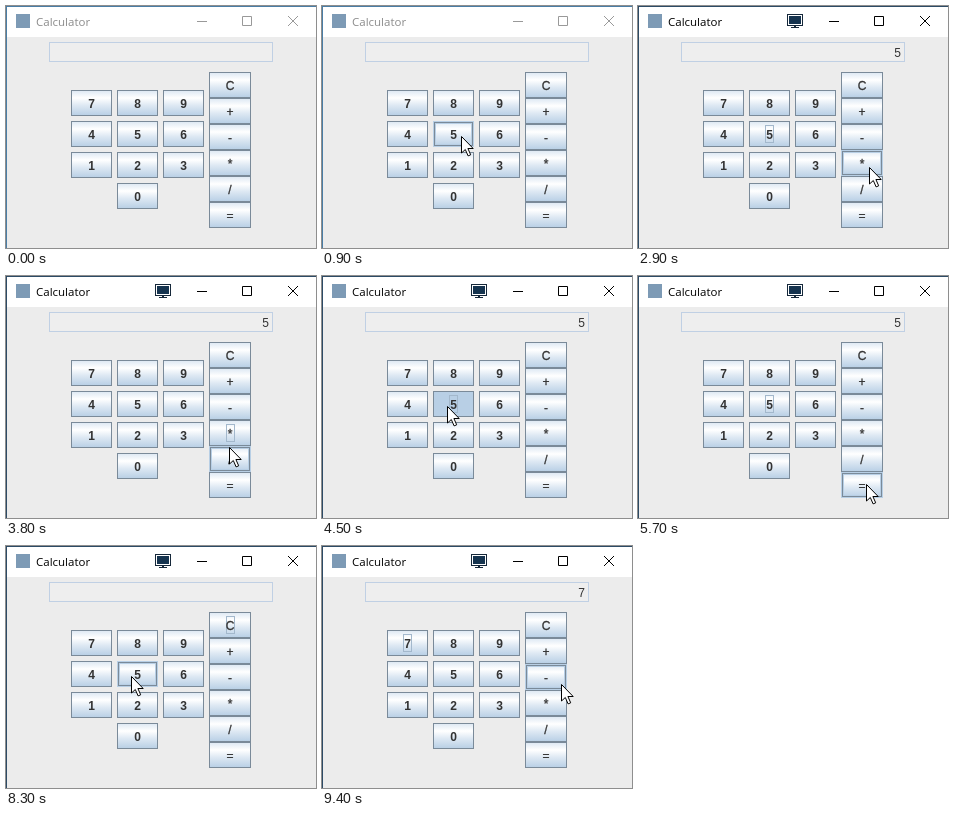
Animation, 310 px wide and 242 px high, one loop 9500 ms. Source, as an HTML page:

```html
<!DOCTYPE html>
<html lang="en">
<head>
<meta charset="utf-8">
<title>Calculator</title>
<style>
html, body { margin: 0; width: 100%; height: 100%; overflow: hidden; background: #ececec; }
svg { display: block; width: 310px; height: 242px; }
text { font-family: "Liberation Sans", Arial, sans-serif; font-size: 12px; fill: #333; }
.key text { font-weight: bold; text-anchor: middle; }
.key .op { font-weight: normal; stroke: #333; stroke-width: .3px; }
.title { font-family: "Open Sans", "Noto Sans", sans-serif; font-size: 11.5px; }
.caption { fill: none; stroke-width: 1; }
</style>
</head>
<body>
<svg viewBox="0 0 310 242">
  <defs>
    <linearGradient id="steel" x1="0" y1="0" x2="0" y2="1">
      <stop offset="0" stop-color="#dde8f3"/>
      <stop offset=".3" stop-color="#fff"/>
      <stop offset=".6" stop-color="#dde8f3"/>
      <stop offset="1" stop-color="#b8cfe5"/>
    </linearGradient>
  </defs>
  <rect width="310" height="242" fill="#ececec"/>
  <rect width="310" height="31" fill="#fff"/>
  <path id="edge" d="M0 .5H310M.5 0V242" fill="none"/>
  <rect x="10" y="8" width="14" height="14" fill="#7d9ab5"/>
  <text id="title" class="title" x="30" y="20">Calculator</text>
  <g id="monitor">
    <rect x="149.5" y="8.5" width="15" height="11" fill="#fff" stroke="#16283a"/>
    <rect x="151" y="10" width="12" height="8" fill="#16344f"/>
    <path d="M156 20h2v1h3v1h-8v-1h3z" fill="#16283a"/>
  </g>
  <g id="caption" class="caption">
    <path d="M191 15.5h10M236.5 10.5h9v9h-9z"/>
    <path d="M282 10l10 10M292 10l-10 10"/>
  </g>
  <rect x="43.5" y="36.5" width="223" height="19" fill="#eee" stroke="#c0d0e4"/>
  <text id="display" x="263" y="51" text-anchor="end"></text>
  <g id="keys"></g>
  <path id="cursor" d="M0 0V16.5L3.8 13L6.6 19.4L9.2 18.3L6.4 12H11.7Z" fill="#fff" stroke="#000"/>
</svg>
<script>
const LOOP = 9500, STEP = 100, HOLD = 100;
const TRAVEL = 600, PAUSE = 200, SAG = 25;
const $ = id => document.getElementById(id);

function add(parent, tag, attrs) {
  const el = document.createElementNS("http://www.w3.org/2000/svg", tag);
  for (const name in attrs) el.setAttribute(name, attrs[name]);
  return parent.appendChild(el);
}

// A one pixel frame, drawn a given distance inside the key
const frame = (g, x, y, w, h, inset, stroke) => add(g, "rect", {
  x: x + inset + .5, y: y + inset + .5,
  width: w - 1 - 2 * inset, height: h - 1 - 2 * inset, fill: "none", stroke
});

const keys = {};
function makeKey(label, x, y, w) {
  const h = 26, mid = x + w / 2;
  const g = add($("keys"), "g", { class: "key" });
  const face = frame(g, x, y, w, h, 0, "#7a8a99");
  const glow = add(g, "g", {});
  for (const inset of [0, 1, 2]) frame(glow, x, y, w, h, inset, inset === 1 ? "#7a8a99" : "#b8cfe5");
  const ring = add(g, "rect", { x: Math.floor(mid - 4) + .5, y: y + 4.5, width: 8, height: 17, fill: "none", stroke: "#a3b8cc" });
  add(g, "text", { x: mid, y: y + 18, class: label >= "0" && label <= "9" ? "" : "op" }).textContent = label;
  keys[label] = { label, x, y, w, h, face, glow, ring };
}

[..."789456123"].forEach((c, i) => makeKey(c, 65 + i % 3 * 46, 84 + Math.floor(i / 3) * 31, 41));
makeKey("0", 111, 177, 41);
[..."C+-*/="].forEach((c, i) => makeKey(c, 203, 66 + i * 26, 42));

// Pointer visits: key, offset from its centre, time, and what a click displays
const visits = [
  { key: "5", dx: -6, dy: -1.5, at: 1200, shows: "5" },
  { key: "*", dx: 7, dy: 4.5, at: 3100, shows: "5" },
  { key: "5", dx: -6, dy: 2.5, at: 4500, shows: "5" },
  { key: "=", dx: 4, dy: -1, at: 5800, shows: "25" },
  { key: "C", dx: 5, dy: 1.5, at: 7300, shows: "" },
  { key: "5", dx: -6, dy: 2.5, at: 8400 },
  { key: "7", dx: 0, dy: 2, at: 8800, shows: "7" },
  { key: "-", dx: 15, dy: 7.5, at: 9600 }
];

function spot({ key, dx, dy }) {
  const k = keys[key];
  return [k.x + k.w / 2 + dx, k.y + k.h / 2 + dy];
}

// The pointer eases from key to key on a slightly sagging path
function pointer(t) {
  let from = [312, 16], free = 0;
  for (const v of visits) {
    const to = spot(v), end = v.at - PAUSE;
    const begin = Math.max(end - TRAVEL, free);
    if (t <= begin) break;
    if (t < end) {
      const u = (t - begin) / (end - begin), k = u * u * (3 - 2 * u);
      return [
        from[0] + (to[0] - from[0]) * k,
        from[1] + (to[1] - from[1]) * k + SAG * Math.sin(Math.PI * u)
      ];
    }
    from = to;
    free = v.at + HOLD;
  }
  return from;
}

const show = (el, on) => el.setAttribute("visibility", on ? "visible" : "hidden");

function draw(t) {
  const [x, y] = pointer(t);
  let focus = "", held = "", value = "";
  for (const v of visits) {
    if (v.shows === undefined || t < v.at) continue;
    focus = v.key;
    if (t < v.at + HOLD) held = v.key;
    else value = v.shows;
  }
  const active = t >= visits[0].at;
  $("title").style.fill = active ? "#000" : "#8c8c8c";
  $("caption").style.stroke = active ? "#000" : "#999";
  $("edge").style.stroke = active ? "#2d4b66" : "#4a7ea6";
  show($("monitor"), t >= 2500);
  $("display").textContent = value;
  for (const k of Object.values(keys)) {
    const over = x >= k.x && x < k.x + k.w && y >= k.y && y < k.y + k.h;
    const down = held === k.label;
    k.face.setAttribute("fill", down ? "#b8cfe5" : "url(#steel)");
    show(k.glow, over && !down);
    show(k.ring, focus === k.label);
  }
  $("cursor").setAttribute("transform", `translate(${Math.floor(x) + .5} ${Math.floor(y) + .5})`);
}

const start = performance.now();
function tick() {
  const t = (performance.now() - start) % LOOP;
  draw(Math.floor(t / STEP) * STEP);
  requestAnimationFrame(tick);
}
tick();
</script>
</body>
</html>
```
